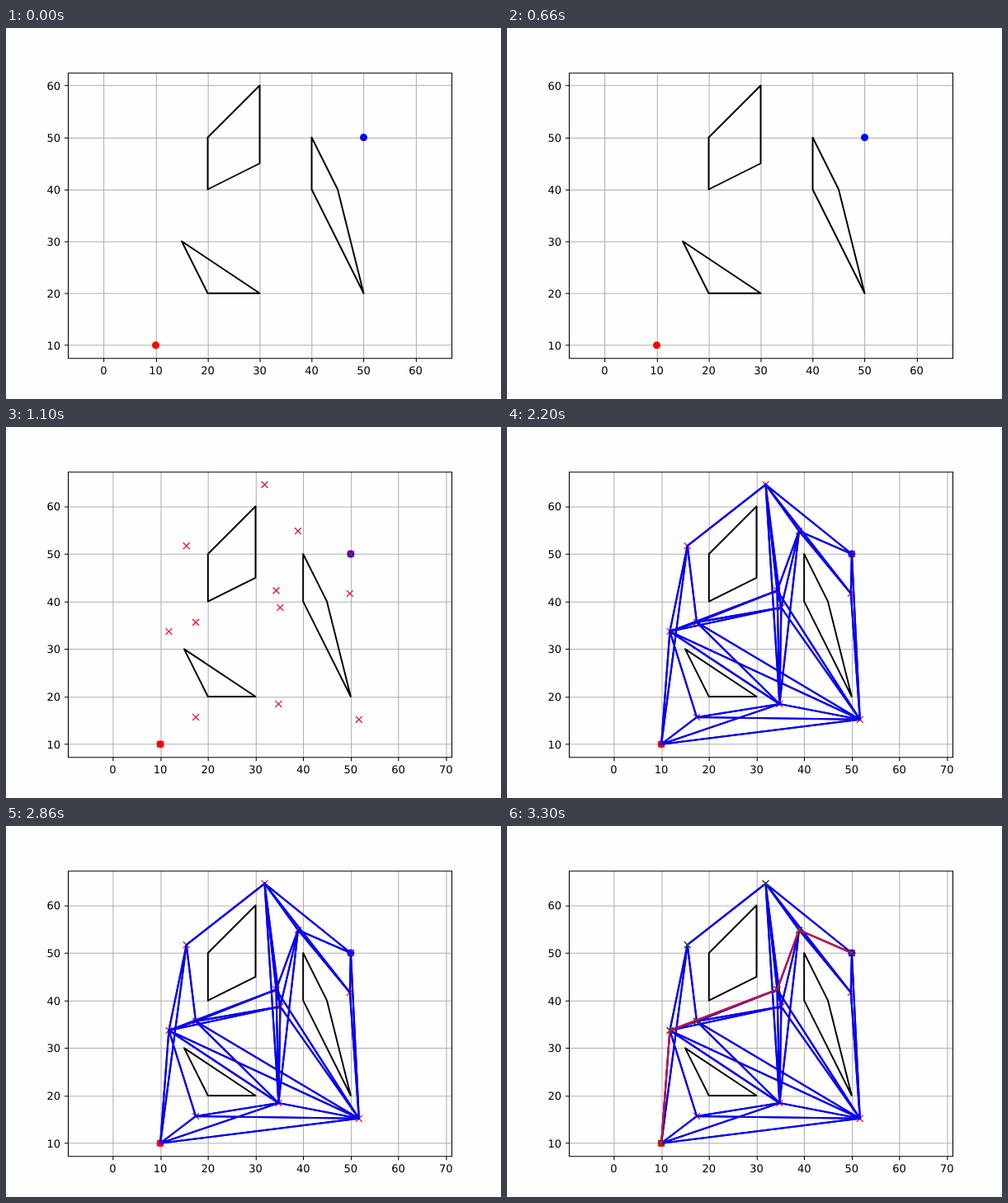
Animation of 600 by 450 pixels, one loop 4400 ms. Source, as an HTML page:

```html
<!DOCTYPE html>
<html lang="en">
<head>
<meta charset="utf-8">
<title>Roadmap planner</title>
<style>
  html, body { margin: 0; width: 100%; height: 100%; overflow: hidden; background: #fefefe; }
  svg { display: block; width: 600px; height: 450px; }
  text { font: 13.02px "DejaVu Sans", sans-serif; fill: #000; text-rendering: geometricPrecision; }
  path { fill: none; }
  .grid { stroke: #b0b0b0; stroke-width: 1.05; }
  .axis { stroke: #000; stroke-width: 1.05; }
  .wall { stroke: #000; stroke-width: 1.95; stroke-linejoin: round; }
  .edge { stroke: #0800ee; stroke-width: 2.15; stroke-linecap: square; }
  .cross { stroke: #f2081e; stroke-width: 1.3; }
  .seen { stroke: #245a28; stroke-width: 1.3; }
  .route { stroke: #e80a20; stroke-width: 1.95; stroke-linejoin: round; stroke-linecap: square; }
  .scene { animation: 4.4s step-end infinite; }
  #setup { animation-name: setup; }
  #plan { animation-name: plan; }
  #edges { animation-name: edges; }
  #found { animation-name: found; }
  @keyframes setup { 0% { opacity: 1 } 25%, 100% { opacity: 0 } }
  @keyframes plan { 0% { opacity: 0 } 25%, 100% { opacity: 1 } }
  @keyframes edges { 0% { opacity: 0 } 50%, 100% { opacity: 1 } }
  @keyframes found { 0% { opacity: 0 } 75%, 100% { opacity: 1 } }
</style>
</head>
<body>
<svg viewBox="0 0 600 450">
  <g id="setup" class="scene"></g>
  <g id="plan" class="scene">
    <g id="chart"></g>
    <g id="edges" class="scene"></g>
    <g id="found" class="scene"></g>
  </g>
</svg>
<script>
const walls = [
  [[20, 40], [20, 50], [30, 60], [30, 45]],
  [[15, 30], [20, 20], [30, 20]],
  [[40, 50], [45, 40], [50, 20], [40, 40]]
];
const nodes = {
  A: [313.5, 69.8], B: [218.7, 144.2], C: [354, 126.2], D: [327.5, 198.4],
  E: [332.4, 219], F: [416.8, 202], G: [230, 236.9], H: [197.4, 248],
  I: [230, 352], J: [330.4, 336], K: [427.8, 354.8],
  S: [187.1, 384.75], T: [417.9, 154]
};
const links = "AB AC AD AE AF AJ AT BG BH BS CD CE CF CJ CT DE DG DH DJ DK " +
  "EG EH EJ EK FK FT GH GJ GK HI HJ HK HS IJ IK IS JK JS KS KT";

const el = id => document.getElementById(id);
const path = (cls, d) => `<path class="${cls}" d="${d}"/>`;
const trail = names => "M" + [...names].map(n => nodes[n]).join("L");
const crosses = (cls, names) => path(cls, [...names].map(n => {
  const [x, y] = nodes[n], s = 3.9;
  return `M${x - s} ${y - s}l${2 * s} ${2 * s}m0 ${-2 * s}l${-2 * s} ${2 * s}`;
}).join(""));

// Straight chart lines sit on the pixel centres of a 640-wide plot.
const snap = v => (Math.round(v * 640 / 600) + 0.5) * 600 / 640;
const box = { l: snap(75), r: snap(540), t: snap(54), b: snap(400.5) };

function chart(x0, y0, scale, lastX) {
  const px = v => x0 + scale * v, py = v => y0 - scale * v;
  const dot = (v, color) => `<circle cx="${px(v)}" cy="${py(v)}" r="4.5" fill="${color}"/>`;
  let grid = "", ticks = "", labels = "";
  for (let v = 0; v <= lastX; v += 10) {
    const x = snap(px(v));
    grid += `M${x} ${box.t}V${box.b}`;
    ticks += `M${x} ${box.b}v4.5`;
    labels += `<text x="${px(v)}" y="419.8" text-anchor="middle">${v}</text>`;
  }
  for (let v = 10; v <= 60; v += 10) {
    const y = snap(py(v));
    grid += `M${box.l} ${y}H${box.r}`;
    ticks += `M${box.l} ${y}h-4.5`;
    labels += `<text x="66" y="${py(v) + 4.9}" text-anchor="end">${v}</text>`;
  }
  const shapes = walls.map(w => "M" + w.map(([x, y]) => [px(x), py(y)]).join("L") + "Z").join("");
  return path("grid", grid) + dot(10, "#f00") + dot(50, "#00f") + path("wall", shapes) +
    path("axis", `M${box.l} ${box.t}H${box.r}V${box.b}H${box.l}Z` + ticks) + labels;
}

// Every link is drawn once from each end.
const roads = path("edge", links.split(" ").map(trail).join(""));

el("setup").innerHTML = chart(118.5, 447.75, 6.3, 60);
el("chart").innerHTML = chart(129.4, 442.44, 5.769, 70) + crosses("cross", Object.keys(nodes));
el("edges").innerHTML = roads + roads;
el("found").innerHTML = crosses("seen", "ABCDGHST") + path("route", trail("TCDHS"));
</script>
</body>
</html>
```
